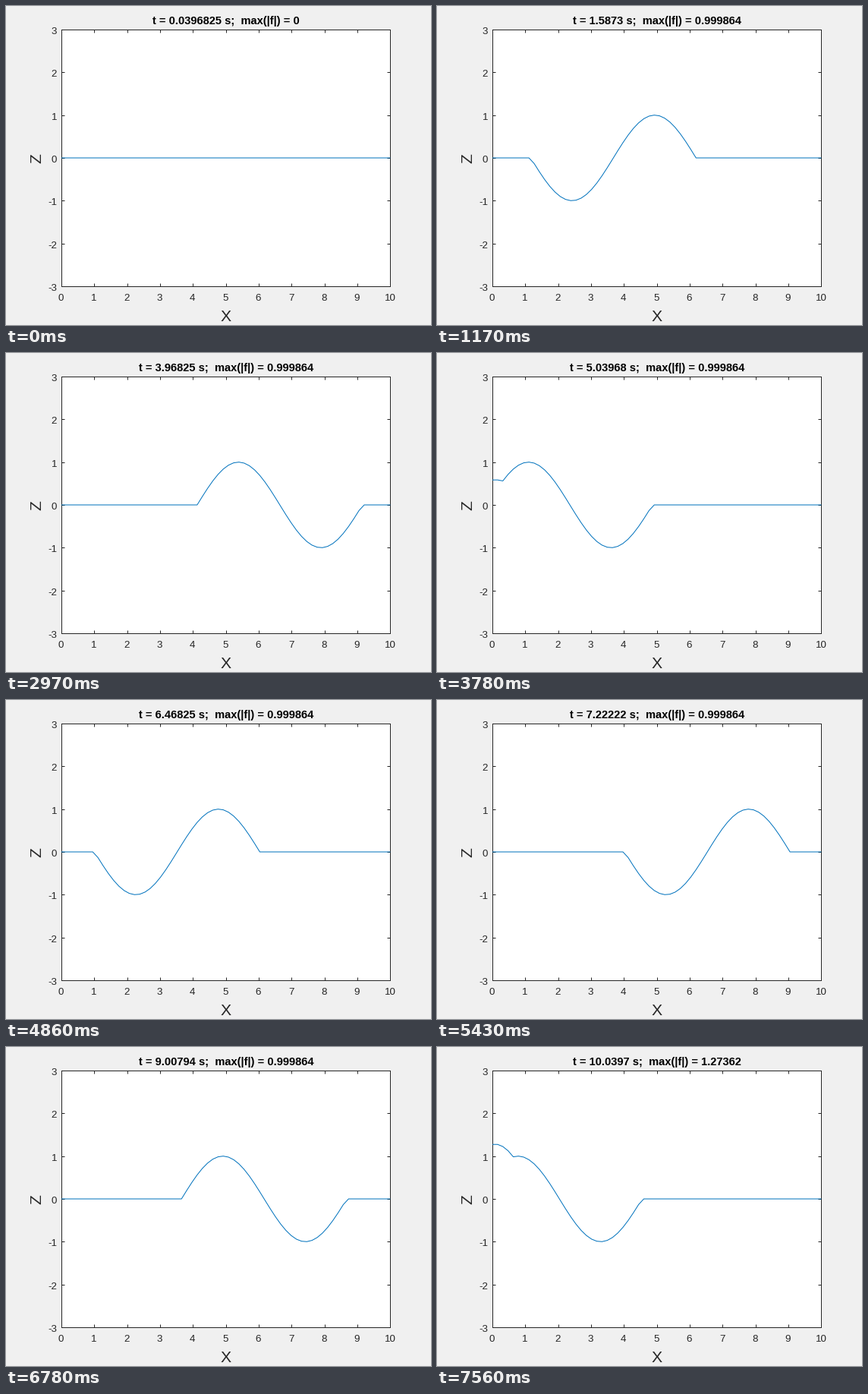
Write a matplotlib script that moves like this. It is 560x420 px and loops after 7.59 s.

```python
import matplotlib.pyplot as plt
import numpy as np
from matplotlib.animation import FuncAnimation

W, H, DPI = 560, 420, 100
PX = 72 / DPI                      # one pixel in points
INK = "#262626"

CELLS = 63
LENGTH, SPEED, OMEGA = 10, 4, 5
DT = LENGTH / CELLS / SPEED        # the wave advances one cell per step
LAP = 2 * (CELLS - 1)              # steps for a round trip between the walls
FRAMES = 253

plt.rcParams["font.family"] = "Liberation Sans"

cell = np.arange(CELLS + 1)
x = cell * LENGTH / CELLS


def pulse(step):
    """One sine period sent from the left wall."""
    phase = OMEGA * DT * step
    return np.where((phase >= 0) & (phase < 2 * np.pi), np.sin(phase), 0.0)


def wave(n):
    """Right- and left-going pulses, mirrored half a cell inside each wall."""
    f = np.zeros(CELLS + 1)
    for lap in range(3):
        age = n - lap * LAP
        f += pulse(age - cell) + pulse(age + cell - (2 * CELLS - 1))
    return f


def label(px, py, text, size, **style):
    style = {"color": INK, "ha": "center", "va": "baseline", **style}
    return fig.text(px / W, 1 - py / H, text, fontsize=size * PX, **style)


fig = plt.figure(figsize=(W / DPI, H / DPI), dpi=DPI, facecolor="#f0f0f0")
left, right, top, bottom = 73, 506.4, 31, 369
ax = fig.add_axes([left / W, 1 - bottom / H, (right - left) / W, (bottom - top) / H])
ax.set(xlim=(0, LENGTH), ylim=(-3, 3), xticks=range(LENGTH + 1), yticks=range(-3, 4))
ax.tick_params(direction="in", top=True, right=True, length=4.4 * PX, width=PX,
               color=INK, labelbottom=False, labelleft=False)
for spine in ax.spines.values():
    spine.set(color=INK, linewidth=PX)

for v in range(LENGTH + 1):
    label(left - 0.5 + v * (right - left) / LENGTH, 388, str(v), 13.33)
for v in range(-3, 4):
    label(67, 206 - v * (bottom - top) / 6, str(v), 13.33, ha="right")
label(289.6, 415, "X", 21.33)
label(46, 200.5, "Z", 21.33, rotation=90, rotation_mode="anchor")
title = label(290, 24, "", 14.67, color="black", weight="bold")

line, = ax.plot(x, 0 * x, color="#0072bd", linewidth=PX, zorder=3,
                clip_on=False, snap=False, solid_capstyle="butt")


def draw(n):
    f = wave(n)
    line.set_ydata(f)
    title.set_text(f"t = {(n + 1) * DT:g} s;  max(|f|) = {np.abs(f).max():g}")
    return line, title


anim = FuncAnimation(fig, draw, frames=FRAMES, interval=30, repeat=True, repeat_delay=0)
plt.show()
```
